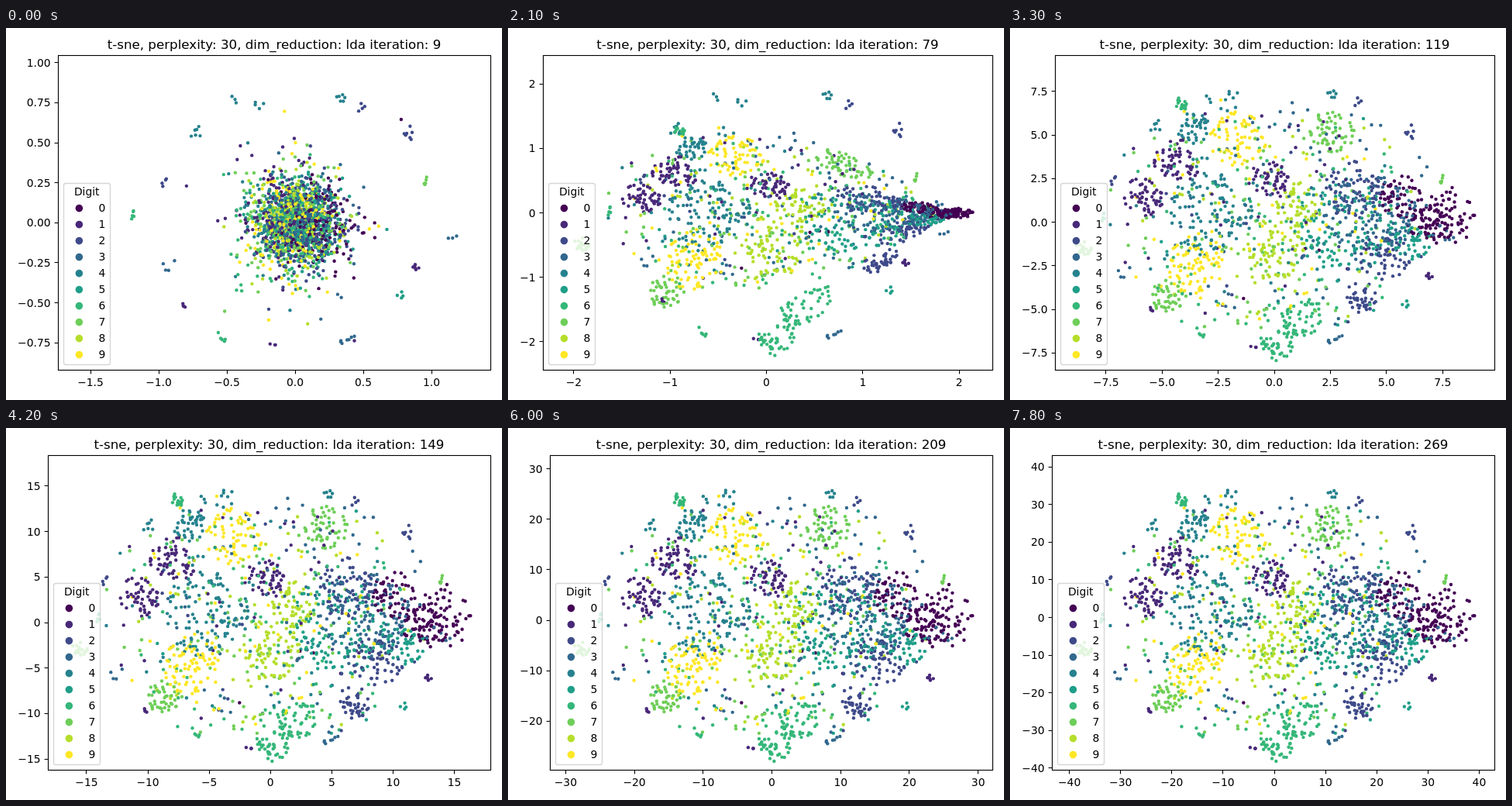
An HTML page with a canvas for the animation above (8 s loop, 640x480 px).

```html
<!DOCTYPE html>
<html lang="en">
<head>
<meta charset="utf-8">
<title>t-sne</title>
<style>
html, body { margin: 0; width: 100%; height: 100%; overflow: hidden; background: #fff; }
canvas { display: block; width: 640px; height: 480px; }
</style>
</head>
<body>
<canvas id="stage" width="640" height="480"></canvas>
<script>
const ctx = document.getElementById('stage').getContext('2d');
const LOOP = 8000, STEP = 300;
const RIGHT = 625.5, TOP = 35.5, BOTTOM = 441.5;
const CX = 345, CY = 244;
const SMALL = '13.89px "DejaVu Sans", sans-serif';
const LARGE = '16.7px "DejaVu Sans", sans-serif';
const COLORS = ['#440154', '#482878', '#3e4a89', '#31688e', '#26828e',
  '#1f9e89', '#35b779', '#6ece58', '#b5de2b', '#fde725'];
const PER_DIGIT = 186, RIM_GROUPS = 17;

// Autoscaled axes: iteration, origin in pixels, data units per pixel
const AXES = [
  [9, 373, 251.3, 1 / 176, 1 / 206.6],
  [39, 316.5, 254, 1 / 105.7, 1 / 81.2],
  [79, 333.5, 238.5, 1 / 124.3, 1 / 83.2],
  [99, 334, 240, 1 / 119, 1 / 82],
  [119, 341, 250.5, 1 / 28.97, 1 / 22.5],
  [179, 341.5, 251.5, 1 / 10.88, 1 / 7.95],
  [239, 339.5, 244.5, 1 / 7.49, 1 / 5.52],
  [269, 341, 244.5, 1 / 6.61, 1 / 4.86]
];

// Where each digit gathers in the end: x, y, radius
const HOMES = [
  [[562, 246, 36], [538, 252, 26], [500, 216, 28]],
  [[216, 169, 28], [171, 217, 25], [334, 195, 24]],
  [[448, 355, 20], [480, 300, 30], [440, 207, 36]],
  [[462, 242, 54]],
  [[260, 240, 52], [235, 125, 20]],
  [[516, 281, 23], [430, 255, 60]],
  [[343, 409, 20], [375, 374, 24], [221, 93, 8]],
  [[413, 128, 26], [203, 345, 22], [95, 285, 9]],
  [[373, 228, 27], [340, 287, 36]],
  [[294, 140, 34], [240, 305, 36]]
];

const mix = (a, b, k) => a + (b - a) * k;
const clamp = v => Math.min(1, Math.max(0, v));
const smooth = v => { const k = clamp(v); return k * k * (3 - 2 * k); };

let seed = 20;
function rand() {
  seed = (seed + 0x6D2B79F5) | 0;
  let t = Math.imul(seed ^ (seed >>> 15), 1 | seed);
  t = (t + Math.imul(t ^ (t >>> 7), 61 | t)) ^ t;
  return ((t ^ (t >>> 14)) >>> 0) / 4294967296;
}
const normal = () => Math.sqrt(-2 * Math.log(1 - rand())) * Math.cos(2 * Math.PI * rand());

function inDisc(x, y, rx, ry) {
  const r = 1.1 * Math.pow(rand(), 0.55), a = 2 * Math.PI * rand();
  return [x + r * rx * Math.cos(a), y + r * ry * Math.sin(a)];
}

// Dense ball that leans towards the later layout, with a thin halo
function ball([x, y]) {
  const s = rand() < 0.07 ? 2 : 1;
  return [373 + (x - CX) * 0.13 + normal() * 25 * s, 250 + (y - CY) * 0.13 + normal() * 28 * s];
}

// The right side narrows to a spike and the top flattens.
function wedge([x, y], loose) {
  const t = smooth((x - 330) / 230);
  const flat = y < CY ? 0.7 : loose ? 0.65 : 1;
  return [x + (600 - x) * 0.4 * t, 238 + (y - CY) * flat * (1 - 0.82 * t)];
}

// The wedge again, shorter on the right and leaning
function lean([x, y]) {
  const shear = 0.4 * (y - 250) * clamp((x - 260) / 80);
  const side = x > 330 ? 330 + (x - 330) * 0.8 : x - 15;
  return [side + shear, 250 + (y - 238) * 0.95 + (x - 330) * 0.1];
}

const dots = [];
const add = (digit, path) => dots.push({ digit, path, order: rand() });

function addPoint(digit, end, loose) {
  const mid = wedge(end, loose);
  add(digit, [ball(end), lean(mid), mid, end]);
}

HOMES.forEach((homes, digit) => {
  let rest = PER_DIGIT;
  for (const [x, y, r] of homes) {
    for (let i = 0; i < 2 * r; i++, rest--) addPoint(digit, inDisc(x, y, r, r), false);
  }
  const mean = j => homes.reduce((sum, h) => sum + h[j], 0) / homes.length;
  const x = mix(CX, mean(0), 0.3), y = mix(CY, mean(1), 0.3);
  for (; rest > 0; rest--) addPoint(digit, inDisc(x, y, 178, 142), true);
});

// Small groups around the rim
for (let i = 0; i < RIM_GROUPS; i++) {
  const angle = (i + rand() * 0.7) / RIM_GROUPS * 2 * Math.PI;
  const digit = 1 + Math.floor(rand() * 7);
  const ring = (x, y, rx, ry) => [x + rx * Math.cos(angle), y + ry * Math.sin(angle)];
  const reach = 0.8 + 0.2 * rand();
  const stops = [
    ring(373, 240, 215 * reach, 180 * reach),
    ring(335, 235, 255 * reach, 175 * reach),
    ring(350, 235, 225 * reach, 178 * reach),
    ring(CX, CY, 226, 168)
  ];
  for (let n = 2 + rand() * 5; n > 0; n--) {
    const u = normal() * 4, v = normal() * 4;
    add(digit, stops.map(([x, y]) => [x + u, y + v]));
  }
}
dots.sort((a, b) => a.order - b.order);

// Expansion, slow drift, then release of the exaggeration at 100
function progress(iteration) {
  if (iteration < 39) return smooth((iteration - 9) / 30);
  if (iteration <= 99) return 1 + clamp((iteration - 39) / 40);
  return 3 - (1 - clamp((iteration - 99) / 40)) ** 3;
}

function axesAt(iteration) {
  const i = Math.max(1, AXES.findIndex(row => row[0] >= iteration));
  const a = AXES[i - 1], b = AXES[i];
  const k = (iteration - a[0]) / (b[0] - a[0]);
  return a.map((v, j) => mix(v, b[j], k));
}

function ticks(min, max) {
  const raw = (max - min) / 9;
  const base = 10 ** Math.floor(Math.log10(raw));
  const unit = [1, 2, 2.5, 5, 10].find(s => s * base >= raw - 1e-9);
  const step = unit * base;
  const digits = Math.max(0, (unit === 2.5 ? 1 : 0) - Math.floor(Math.log10(step) + 1e-9));
  const list = [];
  for (let i = Math.ceil(min / step); i * step <= max; i++) {
    const text = (i < 0 ? '\u2212' : '') + Math.abs(i * step).toFixed(digits);
    list.push({ value: i * step, text });
  }
  return list;
}

function disc(x, y, r, color) {
  ctx.fillStyle = color;
  ctx.beginPath();
  ctx.arc(x, y, r, 0, 2 * Math.PI);
  ctx.fill();
}

function label(text, x, y, align, font = SMALL) {
  ctx.font = font;
  ctx.textAlign = align;
  ctx.fillStyle = '#000';
  ctx.fillText(text, x, y);
}

function line(x1, y1, x2, y2) {
  ctx.beginPath();
  ctx.moveTo(x1, y1);
  ctx.lineTo(x2, y2);
  ctx.stroke();
}

const snap = v => Math.floor(v) + 0.5;

function drawAxes(iteration) {
  const [, ox, oy, ux, uy] = axesAt(iteration);
  const rows = ticks((oy - BOTTOM) * uy, (oy - TOP) * uy);
  ctx.font = SMALL;
  const widest = Math.max(...rows.map(r => ctx.measureText(r.text).width));
  const left = Math.round(24.4 + widest) + 0.5;

  ctx.strokeStyle = '#000';
  ctx.lineWidth = 1.11;
  ctx.strokeRect(left, TOP, RIGHT - left, BOTTOM - TOP);
  for (const { value, text } of rows) {
    const y = oy - value / uy;
    line(left - 4.9, snap(y), left, snap(y));
    label(text, left - 9.9, Math.round(y + 5), 'right');
  }
  for (const { value, text } of ticks((left - ox) * ux, (RIGHT - ox) * ux)) {
    const x = ox + value / ux;
    line(snap(x), BOTTOM, snap(x), BOTTOM + 4.9);
    label(text, x, 462, 'center');
  }
  label('t-sne, perplexity: 30, dim_reduction: lda iteration: ' + iteration,
    (left + RIGHT) / 2 - 0.5, 27, 'center', LARGE);
  return left;
}

function drawLegend(x) {
  ctx.beginPath();
  ctx.roundRect(x, 200.5, 60, 234, 2.8);
  ctx.fillStyle = 'rgba(255,255,255,0.8)';
  ctx.fill();
  ctx.strokeStyle = 'rgba(204,204,204,0.8)';
  ctx.lineWidth = 1.39;
  ctx.stroke();
  label('Digit', x + 29.7, 216, 'center');
  COLORS.forEach((color, i) => {
    const y = 232.6 + i * 21;
    disc(x + 19.9, y, 4.8, color);
    label(String(i), x + 45, Math.round(y + 4.7), 'left');
  });
}

function draw(time) {
  const iteration = 9 + 10 * Math.floor((time % LOOP) / STEP);
  ctx.fillStyle = '#fff';
  ctx.fillRect(0, 0, 640, 480);

  const p = progress(iteration);
  const from = Math.min(2, Math.floor(p)), k = p - from;
  for (const { digit, path } of dots) {
    const a = path[from], b = path[from + 1];
    disc(mix(a[0], b[0], k), mix(a[1], b[1], k), 2.2, COLORS[digit]);
  }
  drawLegend(drawAxes(iteration) + 7);
}

const begin = performance.now();
function tick() {
  draw(Math.max(0, performance.now() - begin));
  requestAnimationFrame(tick);
}
tick();
</script>
</body>
</html>
```
